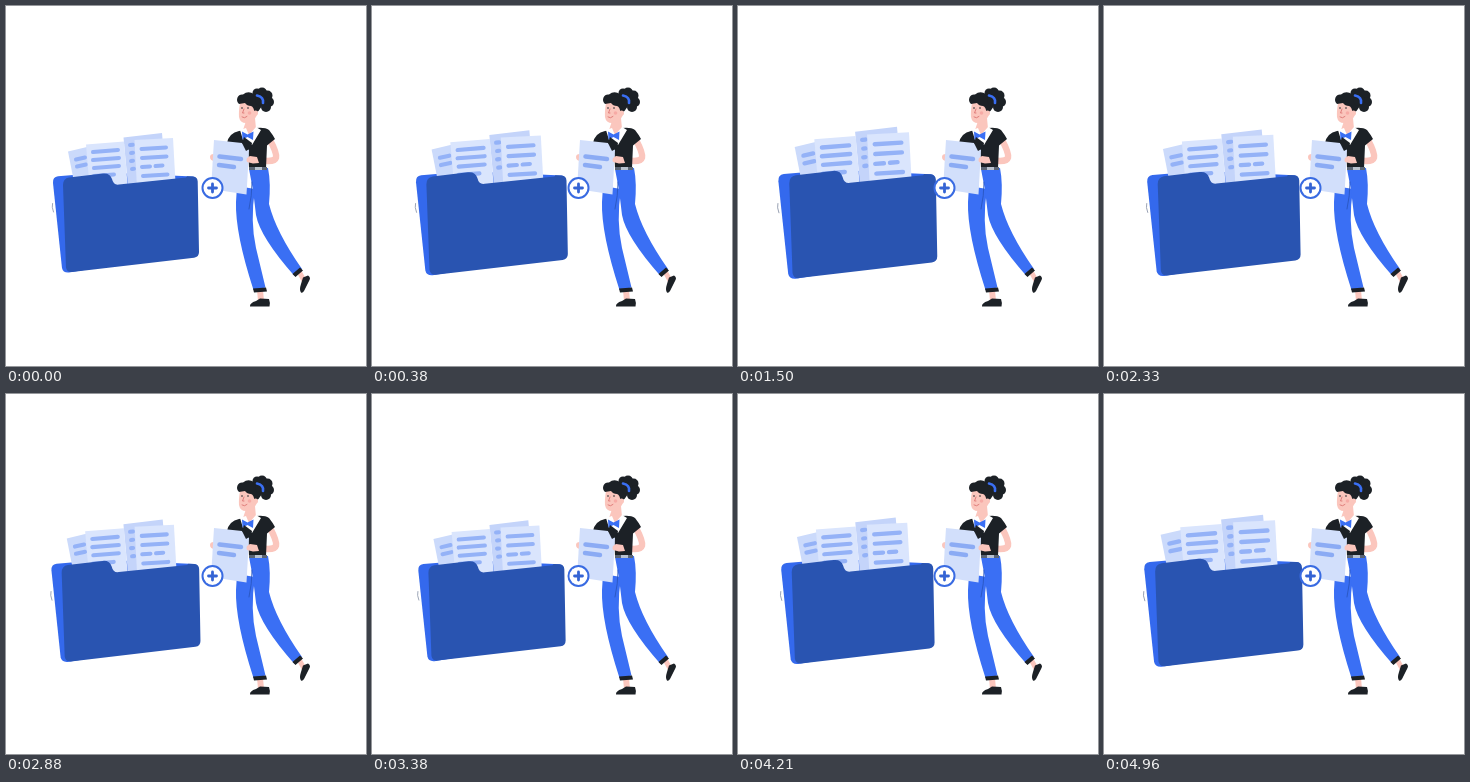
An HTML page that plays this animation: 360 by 360 pixels, repeating every 5000 ms.

```html
<!DOCTYPE html>
<html lang="en">
<head>
<meta charset="utf-8">
<title>Adding a page to a folder</title>
<style>
  html, body { margin: 0; width: 100%; height: 100%; overflow: hidden; background: #fff; }
  svg { display: block; width: 100vw; height: 100vh; }
  .line { fill: none; stroke-linecap: round; stroke-linejoin: round; }
  .rows { stroke: #94b2f7; stroke-width: 4; }
  .skin { fill: #fbc6bd; }
  .ink { fill: #1c2126; }
  .blue { fill: #3a6ff4; }
</style>
</head>
<body>
<svg viewBox="0 0 360 360">
  <g id="folder">
    <path fill="#3469ed" d="M47 177Q46.500 171 52 170.300L98 166.500L187 170.500Q191 171 191 175L186 246L63 266.500Q57 267 56 262Z"/>
    <path fill="#cbdafb" d="M62 145.500L81 141L88 180L69 181Z"/>
    <path class="line rows" d="M70 153.500L79 151.500M71 160.500L80 158.500"/>
    <path fill="#c4d4fa" d="M117.500 131.500L156 127L160 175L122 180Z"/>
    <path class="line rows" stroke-width="3" d="M124 139L127 138.700M125 147L127 146.800M125 155L127 154.800M126 163L128 162.800"/>
    <path fill="#dae5fd" d="M80 138.500L118 135.500L122 183L84 185Z"/>
    <path class="line rows" d="M87 146L112 144M87 154L113 152M88 162L113 160M88 170L108 168.500"/>
    <path fill="#dae5fd" d="M128.500 134L167 132L169.500 177L131 182Z"/>
    <path class="line rows" d="M135.500 143L160 141.500M136 152L160.500 150.500M136 161L144 160.500M149.500 160L156.500 159.500M137 170L161.500 168.500"/>
    <path fill="#2954b1" d="M57 179Q57 172.500 63 171.500L97 167.500Q104 166.700 106 173Q107.500 179.500 113 178.500L180 171.500L181 170.300L187 170.500Q191.500 171 191.700 175.500L193 246Q193 251 188 251.700L66 266Q61 266.500 60 261.500Z"/>
    <path class="line" stroke="#8792a7" stroke-width=".8" d="M46.500 197.500Q45.500 201 47.500 206"/>
  </g>

  <g id="woman">
    <!-- legs and shoes -->
    <path class="skin" d="M251 284L257 284L258 295L252 295ZM291 267L295 264L300 273L296 276Z"/>
    <path class="ink" d="M244 300.500Q243.500 297 250 295L254 292.500L263 293Q264.500 297 263.500 300.500Z"/>
    <path class="ink" d="M295 286.500Q293 284 295 278L297 271.500L302 269.500Q305 271.500 303.500 274L298 285Q296.500 287.500 295 286.500Z"/>
    <path class="blue" d="M231 180L249 183Q244 215 250 242L259.500 281.500L247.500 284Q229 227 230 196Z"/>
    <path class="blue" d="M243 163L262 162Q265 177 263 198Q270 226 296 263L288.500 270Q254 231 250 209L247 184Z"/>
    <path class="line" stroke="#2854b9" stroke-width=".8" d="M246 176Q246 190 243 203"/>
    <path class="ink" d="M247 282.500L260 281.500L261 285.500L248 286.500ZM286.500 268L294 261.500L297 264.500L289.500 271Z"/>

    <!-- arm and torso -->
    <path class="line" stroke="#fbc6bd" stroke-width="6.500" d="M264 134Q271 147 270 151.500Q269 155 262 155L246 154"/>
    <path class="ink" d="M221 137Q223 127 233 125L250 122Q259 121 263 124Q267 129 269 133L261 139.500L260 162L243 162L242 139Z"/>
    <path fill="#5b6575" d="M243 161H261V164H243Z"/>
    <path fill="#b9c1ce" d="M249 161H256V164H249Z"/>
    <path class="skin" d="M241 112H249L250 123L243 130L237 124Z"/>
    <path fill="#fff" d="M234 124L240 122L243 129L250 121L255 124L246 139L237 134Z"/>
    <path class="blue" d="M236 125.500L241.500 128.500L247.500 125.500L247 134L241.500 131L236.500 133.500Z"/>

    <!-- head -->
    <path class="skin" d="M234 97Q232.500 106 233 111Q234 117 240 117Q248 116 251 109L250 94L237 92Z"/>
    <g class="ink">
      <path d="M233 98Q230 95 231.500 91.500Q233 88 237 88.500Q242 84.500 248 88L255 92L256 100L252.500 105L248.500 107Q248 101 245 100Q241 100 239 97Z"/>
      <circle cx="251" cy="87" r="4.500"/>
      <circle cx="256" cy="86.500" r="5"/>
      <circle cx="261.500" cy="89.500" r="5"/>
      <circle cx="263" cy="96" r="5"/>
      <circle cx="260" cy="101" r="5"/>
      <circle cx="255" cy="94" r="6"/>
      <circle cx="236" cy="102" r=".8"/>
      <circle cx="242" cy="102" r=".8"/>
    </g>
    <path class="line" stroke="#3a6ff4" stroke-width="2.600" d="M251 89.500Q258 91 257 97"/>
    <circle cx="249.500" cy="107" r="2.500" class="skin"/>
    <circle cx="243.500" cy="107" r="1.800" fill="#f7aaa5"/>
    <path class="line" stroke="#d86d6b" stroke-width=".8" d="M238 103L236.500 107H238M236 111Q238.500 113 241 110.500"/>

    <!-- page in hand -->
    <path class="skin" d="M209 148Q204 147.500 204 151Q204 155 209 155Z"/>
    <path fill="#d2dffb" d="M208 134L236 137L243 144L240.500 188.500L205 183Z"/>
    <path class="ink" d="M238 131L246 137L245 142L240 145L236 137Z"/>
    <path class="line" stroke="#8babf4" stroke-width="4.500" d="M213.500 150.500L235 153M213 159L228 161"/>
    <path class="skin" d="M251 151L244 150Q239 152 241 156L247 157.500L253 157Z"/>

    <circle cx="206.500" cy="182" r="10" fill="#fff" stroke="#396be2" stroke-width="2"/>
    <path class="line" stroke="#3564d4" stroke-width="2.800" d="M202.500 182H210.500M206.500 178V186"/>
  </g>
</svg>
<script>
  const LOOP = 5000, CX = 122, CY = 197, GROWTH = 0.09;
  const folder = document.getElementById('folder');
  const mix = (a, b, k) => a + (b - a) * k;
  const smooth = k => (1 - Math.cos(Math.PI * k)) / 2;

  // Breathing: quick swell, slow release, second swell cut by the loop
  function swell(t) {
    if (t < 1300) return Math.sin(Math.PI / 2 * t / 1300);
    if (t < 3400) return mix(1, 0.1, smooth((t - 1300) / 2100));
    return mix(0.1, 1, smooth((t - 3400) / 1600));
  }

  function draw(now) {
    const s = 1 + GROWTH * swell(now % LOOP);
    folder.setAttribute('transform', `translate(${CX} ${CY}) scale(${s}) translate(${-CX} ${-CY})`);
    requestAnimationFrame(draw);
  }
  draw(performance.now());
</script>
</body>
</html>
```
